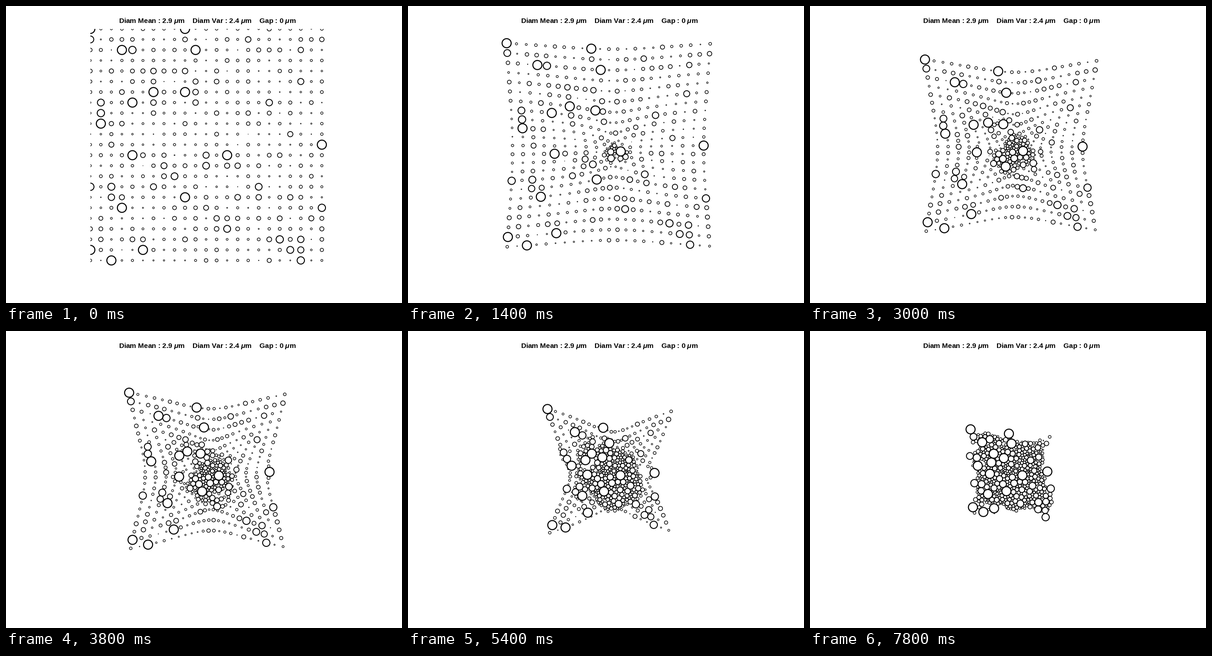
Animation of 864x648 px, one loop 8 s. Source, as a matplotlib script:

```python
import numpy as np
import matplotlib.pyplot as plt
from matplotlib.animation import FuncAnimation
from matplotlib.collections import EllipseCollection

plt.rcParams["mathtext.fontset"] = "custom"
plt.rcParams["mathtext.it"] = "Liberation Sans:italic:bold"

W, H, DPI = 864, 648, 100
FRAMES, INTERVAL = 40, 200
SIDE, PITCH = 23, 22.96
ORIGIN = np.array([184.0, 50.0])
CENTER = np.array([447.5, 313.3])
SPEED = 6.3        # px per frame
SUBSTEPS = 100
REPULSION = 0.1
BOUNCE = 0.02      # extra push, so that touching disks come free again

# Cells (column, row) of the biggest disks; all other sizes are random.
BIG_RADIUS = 9.9
BIG_CELLS = [(0, 0), (9, 0), (3, 2), (10, 2), (6, 6), (9, 6), (4, 7), (1, 9),
             (22, 11), (4, 12), (13, 12), (9, 16), (3, 17), (0, 21), (5, 21),
             (2, 22)]


def make_disks():
    rng = np.random.default_rng(7)
    radius = np.clip(rng.gamma(3.5, 0.91, (SIDE, SIDE)), 0.3, 8)
    for col, row in BIG_CELLS:
        radius[row, col] = BIG_RADIUS
    rows, cols = np.mgrid[:SIDE, :SIDE]
    pos = ORIGIN + PITCH * np.column_stack([cols.ravel(), rows.ravel()])
    return pos, radius.ravel()


def near_pairs(pos, radius):
    gap = np.hypot(*(pos[:, None] - pos[None]).transpose(2, 0, 1))
    gap -= radius[:, None] + radius[None]
    return np.nonzero(np.triu(gap < 2 * SPEED + 2, 1))


def advance(pos, radius):
    """Free disks drift to the center, overlapping disks only repel."""
    pos = pos.copy()
    n = len(pos)
    i, j = near_pairs(pos, radius)
    reach = radius[i] + radius[j]
    step = SPEED / SUBSTEPS
    for _ in range(SUBSTEPS):
        delta = pos[i] - pos[j]
        dist = np.hypot(delta[:, 0], delta[:, 1]) + 1e-9
        hit = dist < reach
        a, b = i[hit], j[hit]
        force = REPULSION * (reach - dist)[hit] + BOUNCE
        push = delta[hit] * (force / dist[hit])[:, None]

        move = CENTER - pos
        far = np.hypot(move[:, 0], move[:, 1])
        move *= (step / np.maximum(far, step))[:, None]
        move[a] = 0
        move[b] = 0
        for k in range(2):
            move[:, k] += (np.bincount(a, push[:, k], n)
                           - np.bincount(b, push[:, k], n))
        pos += move
    return pos


start, radius = make_disks()
path = [start]
for _ in range(FRAMES - 1):
    path.append(advance(path[-1], radius))

fig = plt.figure(figsize=(W / DPI, H / DPI), dpi=DPI, facecolor="white")
left, top, size = 183.5, 49.5, 528
ax = fig.add_axes([left / W, 1 - (top + size) / H, size / W, size / H])
ax.set_xlim(left, left + size)
ax.set_ylim(top + size, top)
ax.axis("off")

disks = EllipseCollection(
    2 * radius, 2 * radius, np.zeros_like(radius), units="xy",
    offsets=start, offset_transform=ax.transData, facecolors="none",
    edgecolors="black", linewidths=0.72 * (0.85 + 0.14 * radius))
ax.add_collection(disks, autolim=False)

mu = r"$\mathit{\mu}$m"
fig.text(439.2 / W, 1 - 37 / H,
         f"Diam Mean : 2.9 {mu}    Diam Var : 2.4 {mu}    Gap : 0 {mu}",
         family="Liberation Sans", weight="bold", size=15.4 * 72 / DPI,
         ha="center", va="baseline", color="black")


def draw(frame):
    disks.set_offsets(path[frame])
    return (disks,)


anim = FuncAnimation(fig, draw, frames=FRAMES, interval=INTERVAL,
                     repeat=True, repeat_delay=0, blit=False)
plt.show()
```
